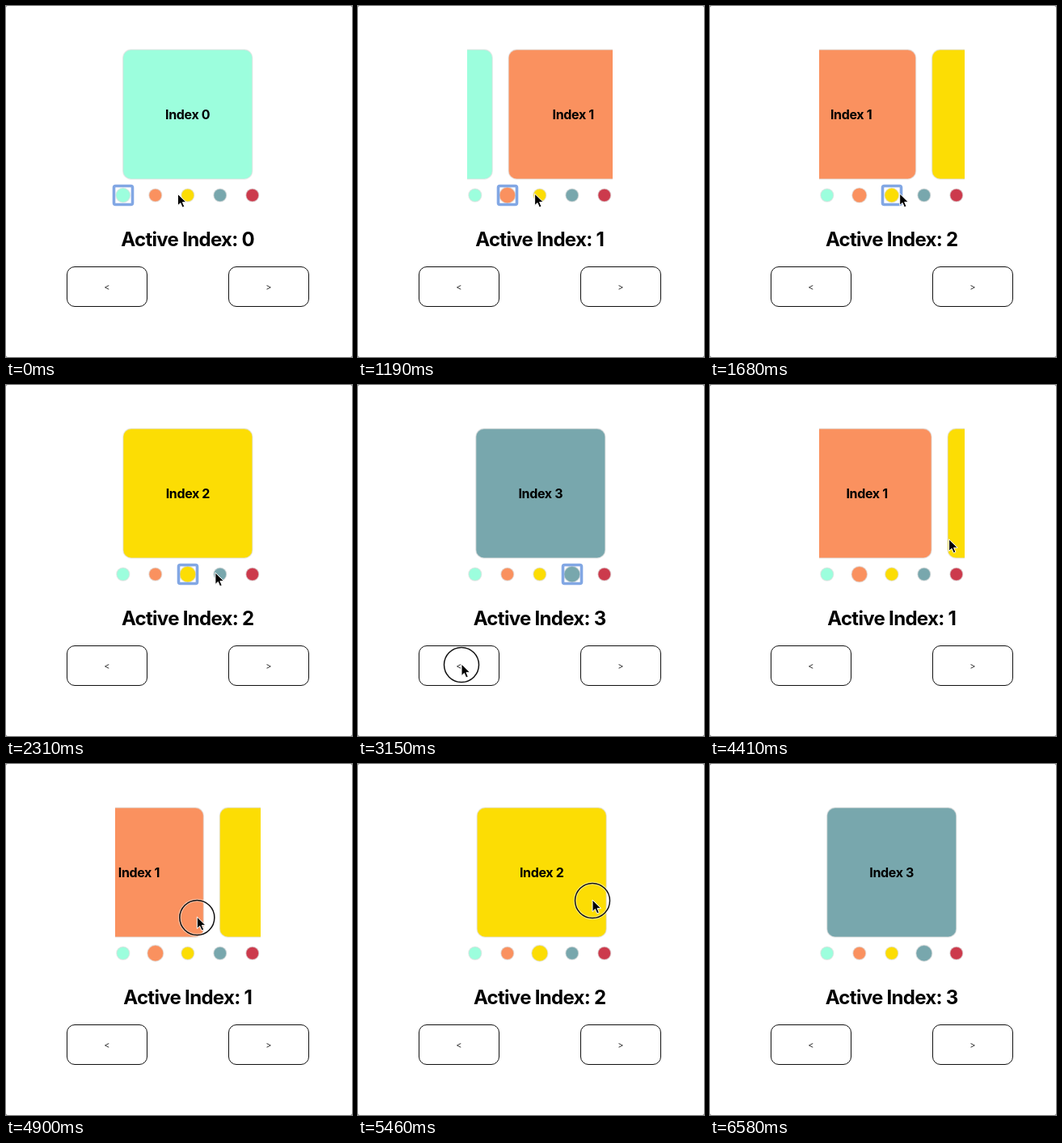
An HTML page that plays this animation: 428 px wide and 434 px high, repeating every 6650 ms.

```html
<!DOCTYPE html>
<html lang="en">
<head>
<meta charset="utf-8">
<title>Carousel</title>
<style>
  html, body { margin: 0; width: 100%; height: 100%; overflow: hidden; background: #777; }
  svg { display: block; }
  text { font: 700 16px Inter, "Liberation Sans", sans-serif; letter-spacing: -.35px; text-anchor: middle; }
  #title { font-size: 24px; letter-spacing: -.7px; }
  #cards rect, #dots circle { stroke: #ddd; stroke-opacity: .55; stroke-width: 1.4; }
  .button rect { fill: none; stroke: #111; }
  .button text { font-size: 11px; font-weight: 400; letter-spacing: 0; fill: #333; }
  #ring { fill: none; stroke: #82a7e4; stroke-width: 3.6; }
  #press { fill: none; }
</style>
</head>
<body>
<svg width="428" height="434" viewBox="0 0 428 434">
  <clipPath id="view"><rect x="135" y="50" width="180" height="168"/></clipPath>
  <rect width="428" height="434" rx="2" fill="#fff"/>
  <g clip-path="url(#view)"><g id="cards"></g></g>
  <g id="dots"></g>
  <text id="title" x="224.7" y="297"></text>
  <g class="button"><rect x="75.5" y="322.5" width="99" height="49" rx="9.5"/><text x="125" y="352">&lt;</text></g>
  <g class="button"><rect x="275.5" y="322.5" width="99" height="49" rx="9.5"/><text x="325" y="352">&gt;</text></g>
  <rect id="ring" rx="2"/>
  <g id="cursor">
    <g id="press">
      <circle cy="1" r="21.5" stroke="#fff" stroke-opacity=".5" stroke-width="3.5"/>
      <circle cy="1" r="21.5" stroke="#111" stroke-width="1.5"/>
    </g>
    <path d="M0 0V14.5L3.4 11.4L5.7 16.8L8.3 15.7L6 10.4H10.6Z" stroke="#fff"/>
  </g>
</svg>
<script>
const LOOP = 6650, STEP = 70, PITCH = 180;
const colors = ['#9cfedd', '#fa915f', '#fcdd04', '#78a7ad', '#cc3a4c'];
const $ = id => document.getElementById(id);
const show = (id, on) => $(id).style.display = on ? '' : 'none';
const set = (node, attrs) => Object.entries(attrs).forEach(a => node.setAttribute(...a));

// Each gesture ends on card `to`; those with dx are drags, the rest are clicks.
const gesture = (down, up, x, y, to, dx = 0) => ({ down, up, x, y, to, dx });
const gestures = [
  gesture(-150, -80, 224, 232, 0),
  gesture(900, 975, 184, 233, 1),
  gesture(1520, 1600, 224, 232, 2),
  gesture(2520, 2600, 259, 232, 3),
  gesture(3150, 3220, 128, 345, 2),
  gesture(3920, 4250, 191, 200, 1, 100),
  gesture(4690, 5060, 296.5, 189, 2, -106),
  gesture(5460, 5740, 290, 168, 3, -96),
  gesture(6440, LOOP, 215, 401, 3)
];
const exit = gestures.at(-1).down;

$('cards').innerHTML = colors.map((c, i) =>
  `<g transform="translate(${144.7 + i * PITCH} 54)"><rect width="160" height="160" rx="10" fill="${c}"/>` +
  `<text x="80" y="86">Index ${i}</text></g>`).join('');
$('dots').innerHTML = colors.map((c, i) =>
  `<circle cx="${144.8 + i * 40}" cy="234" fill="${c}"/>`).join('');

const dragAt = (g, t) => g.dx * Math.min(1, Math.max(0, (t - g.down) / (g.up - g.down)));

// The pointer eases out from one release to the next press.
function pointer(t) {
  const i = gestures.findLastIndex(g => t >= g.down);
  const g = gestures[i], next = gestures[i + 1];
  const x = g.x + dragAt(g, t);
  if (t < g.up || !next) return [x, g.y];
  const s = 1 - (1 - (t - g.up) / (next.down - g.up)) ** 4;
  return [x + (next.x - x) * s, g.y + (next.y - g.y) * s];
}

// Critically damped spring towards the active card, plus the current drag.
function stateAt(t) {
  let from = 0, active = 0, previous = 0, start = -1e4, drag = 0, down = false, focus;
  const spring = now => {
    const x = .01304 * (now - start);
    return active + (from - active) * (1 + x) * Math.exp(-x);
  };
  for (const g of gestures) {
    if (t < g.down || g.down === exit) break;
    if (t >= g.down + STEP) focus = g.dx ? undefined : g;
    drag = -dragAt(g, t) / PITCH;
    down = t < g.up;
    if (down) break;
    from = spring(g.up) + drag;
    previous = active;
    active = g.to;
    start = g.up;
    drag = 0;
  }
  return { pos: spring(t) + drag, active, previous, focus, down, grow: Math.min(1, (t - start) / 180) };
}

function setRing(focus) {
  show('ring', focus);
  if (!focus) return;
  const [x, y, width, height] = focus.y > 300
    ? [73.5, 320.5, 103, 53] : [133.5 + focus.to * 40, 222.5, 23, 23];
  set($('ring'), { x, y, width, height });
}

function draw(now) {
  const t = Math.floor(now % LOOP / STEP) * STEP;
  const s = stateAt(t);
  set($('cards'), { transform: `translate(${-s.pos * PITCH} 0)` });
  [...$('dots').children].forEach((dot, i) => {
    const on = i === s.active ? s.grow : i === s.previous ? 1 - s.grow : 0;
    set(dot, { r: 8 + 2 * on });
  });
  $('title').textContent = `Active Index: ${s.active}`;
  setRing(s.focus);
  set($('cursor'), { transform: `translate(${pointer(t)})` });
  show('cursor', t < exit);
  show('press', s.down);
}

let origin;
function tick(now) {
  origin ??= now;
  draw(now - origin);
  requestAnimationFrame(tick);
}
draw(0);
requestAnimationFrame(tick);
</script>
</body>
</html>
```
